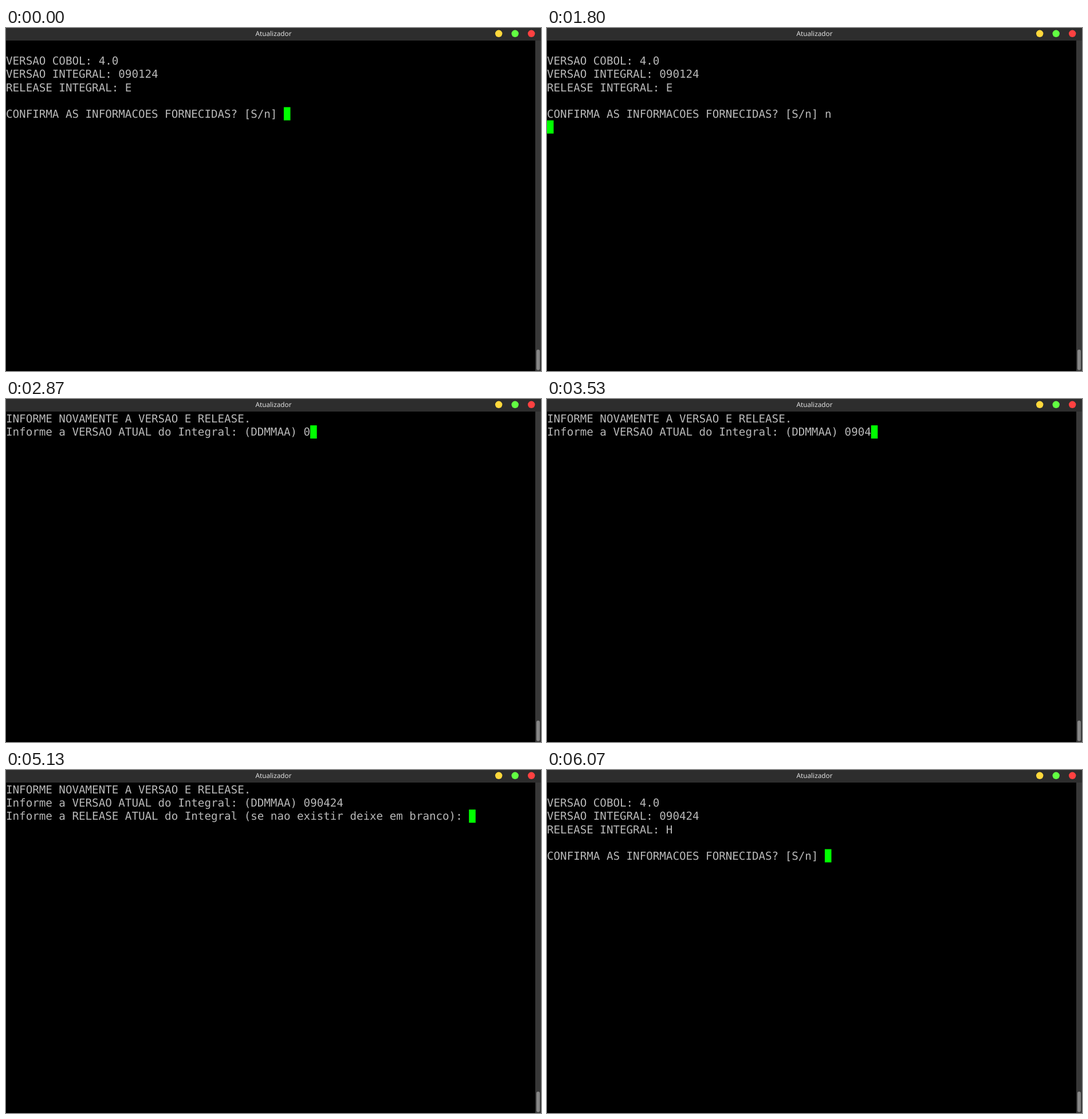
An HTML page that plays this animation: 934x600 px, repeating every 8000 ms.

```html
<!DOCTYPE html>
<html lang="pt">
<head>
<meta charset="utf-8">
<title>Atualizador</title>
<style>
  html, body { margin: 0; width: 100%; height: 100%; overflow: hidden; background: #000; }
  svg { display: block; }
  text { text-rendering: geometricPrecision; white-space: pre; }
  .title { font: 500 11.8px "Noto Sans", "Open Sans", sans-serif; fill: #e0e0e0; text-anchor: middle; }
  #lines { font: 20px "DejaVu Sans Mono", monospace; letter-spacing: -.041px; fill: #b8b8b8; }
</style>
</head>
<body>
<svg width="934" height="600" viewBox="0 0 934 600">
  <rect width="934" height="600"/>
  <rect width="934" height="22" fill="#2d2d2d"/>
  <text class="title" x="467" y="14.2">Atualizador</text>
  <circle cx="860.2" cy="9.8" r="6.2" fill="#ffd83c"/>
  <circle cx="888.7" cy="9.8" r="6.2" fill="#62ff42"/>
  <circle cx="917.2" cy="9.8" r="6.2" fill="#ff4141"/>
  <rect x="924" y="22" width="10" height="578" fill="#383838"/>
  <rect x="926" y="562.5" width="6" height="36" rx="3" fill="#868686"/>
  <g transform="translate(0 23) scale(.9622)">
    <rect id="cursor" width="12" height="24" fill="#0f0"/>
    <g id="lines"></g>
  </g>
</svg>
<script>
const DURATION = 8000, CELL_W = 12, CELL_H = 24, BASELINE = 19;
const CLEAR = "\f";
const cursor = document.getElementById("cursor");
const lines = document.getElementById("lines");

const summary = (version, release) => CLEAR +
  `\nVERSAO COBOL: 4.0\nVERSAO INTEGRAL: ${version}\nRELEASE INTEGRAL: ${release}\n\n` +
  "CONFIRMA AS INFORMACOES FORNECIDAS? [S/n] ";

// Terminal output: [time in ms, characters written]
const output = [
  [0, summary("090124", "E")],
  [600, "n"],
  [1800, "\n"],
  [1870, CLEAR + "INFORME NOVAMENTE A VERSAO E RELEASE.\n" +
         "Informe a VERSAO ATUAL do Integral: (DDMMAA) "],
  [2870, "0"], [3130, "9"], [3400, "0"], [3530, "4"], [4130, "2"], [4400, "4"],
  [5070, "\n"],
  [5130, "Informe a RELEASE ATUAL do Integral (se nao existir deixe em branco): "],
  [5670, "h"],
  [6000, "\n"],
  [6070, summary("090424", "H")],
];

let shown = null;

function render(time) {
  const written = output.filter(([start]) => start <= time).map(([, text]) => text).join("");
  if (written === shown) return;
  shown = written;
  const rows = written.split(CLEAR).pop().split("\n");
  lines.replaceChildren(...rows.map((row, i) => {
    const text = document.createElementNS("http://www.w3.org/2000/svg", "text");
    text.setAttribute("y", i * CELL_H + BASELINE);
    text.textContent = row;
    return text;
  }));
  cursor.setAttribute("x", rows.at(-1).length * CELL_W);
  cursor.setAttribute("y", (rows.length - 1) * CELL_H);
}

const start = performance.now();
function tick() {
  render((performance.now() - start) % DURATION);
  requestAnimationFrame(tick);
}
tick();
</script>
</body>
</html>
```
